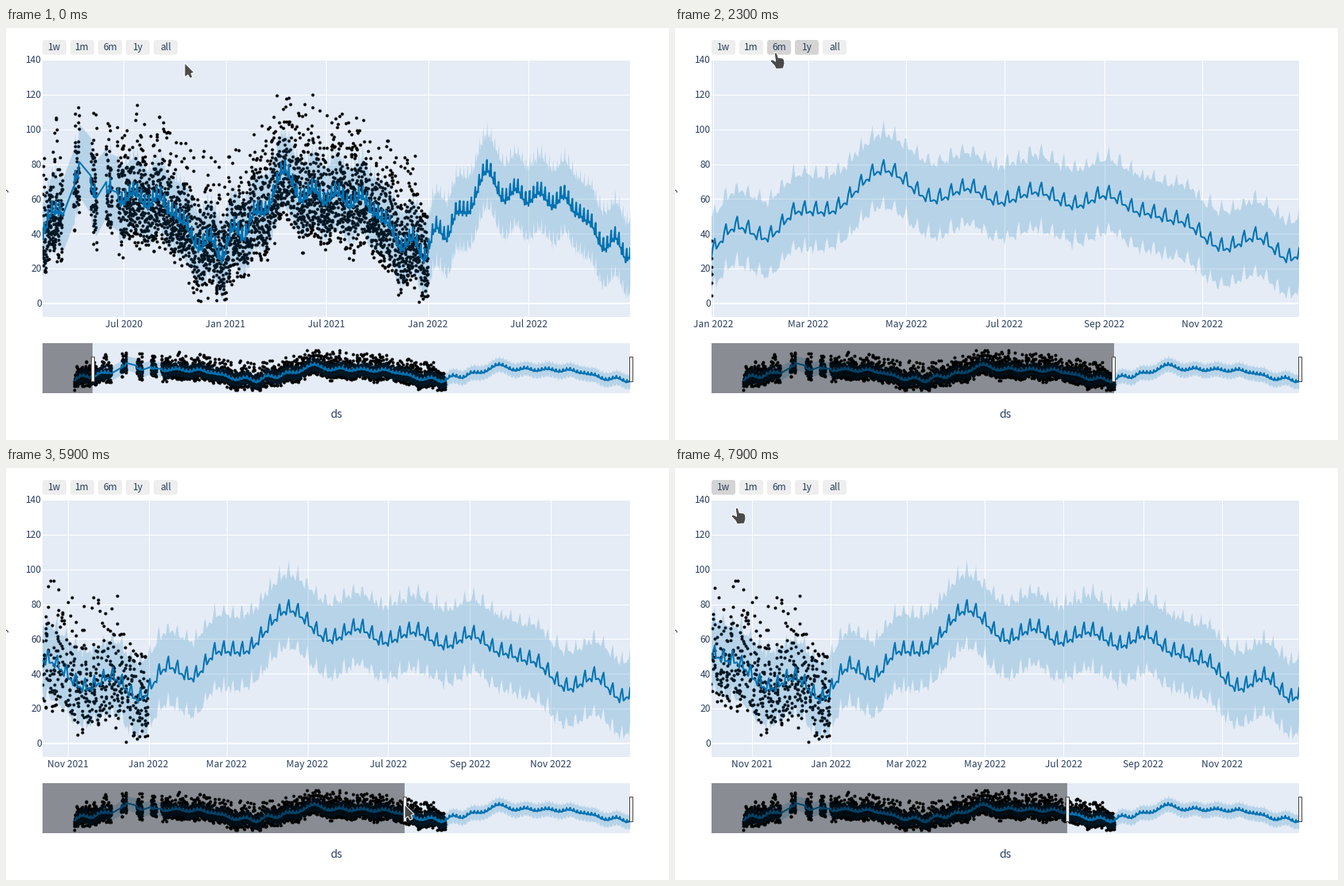
Animation, 835 px wide and 519 px high, one loop 8000 ms. Source, as a matplotlib script:

```python
import matplotlib.pyplot as plt
import numpy as np
from matplotlib.animation import FuncAnimation
from matplotlib.patches import FancyBboxPatch, Polygon, Rectangle

W, H, DPI = 835, 519, 64
PT = 72 / DPI                       # points per pixel
LEFT, RIGHT, TOP, BOTTOM = 46, 786, 40, 364
S_TOP, S_BOTTOM = 397, 460
Y_RANGE = (-7.75, 140)
END, FULL = 1095, 1158              # days since 2020-01-01; slider span in days
BLUE, PAPER, INK = "#0072B2", "#E5ECF6", "#2a3f5f"
IDLE, DARK = "#eeeeee", "#d4d4d4"

plt.rcParams["font.family"] = "Noto Sans CJK JP"


def ease(u):
    return u * u * (3 - 2 * u)


def eased(x, xs, ys):
    """Value at x on a curve that rests at every key point."""
    i = np.clip(np.searchsorted(xs, x, side="right") - 1, 0, len(xs) - 2)
    u = np.clip((x - xs[i]) / (xs[i + 1] - xs[i]), 0, 1)
    return ys[i] + (ys[i + 1] - ys[i]) * ease(u)


# ---------------------------------------------------------------- data
# turning points of the year (week, level), then offsets Monday to Sunday
TURNS = np.array([(2, 43), (4.5, 36.5), (7.5, 52), (10, 51.5), (15, 75.5),
                  (19.5, 58.5), (22.5, 65), (25.3, 57), (28.5, 63), (32, 55),
                  (34.7, 61), (38, 51), (41, 46.5), (45.3, 30.5), (48, 37),
                  (51, 24.5)])
TURNS = np.vstack([TURNS, TURNS[0] + (365.25 / 7, 0)])
WEEK = np.array([0, 0.3, 1, 0.5, -1.3, 4, 7])


def forecast(day):
    week = ((day - 732) / 7 - 2) % (365.25 / 7) + 2
    return eased(week, *TURNS.T) + WEEK[(day + 2) % 7]


rng = np.random.default_rng(12)
spans = [(0, 73), (92, 103), (123, 134), (151, 161), (171, 731)]
past = np.concatenate([np.arange(a, b) for a, b in spans])
days = np.concatenate([past, np.arange(731, END + 1)])
yhat = forecast(days)
upper = yhat + 21 + rng.normal(0, 1, len(days))
lower = yhat - 21 + rng.normal(0, 1, len(days))

# skewed scatter: dense below the line, long tail above it
obs_x = np.repeat(past, rng.integers(4, 8, len(past)))
noise = np.clip(rng.gamma(6, 6.5, len(obs_x)) - 39, -33, 48)
obs_y = np.abs(forecast(obs_x) + noise - 1) + 1

months = np.arange("2020-01", "2023-01", dtype="datetime64[M]")
month_day = (months.astype("datetime64[D]")
             - np.datetime64("2020-01-01")).astype(int)
NAMES = "Jan Feb Mar Apr May Jun Jul Aug Sep Oct Nov Dec".split()
month_name = [f"{NAMES[i % 12]} {2020 + i // 12}" for i in range(36)]

# ---------------------------------------------------------------- stage
fig = plt.figure(figsize=(W / DPI, H / DPI), dpi=DPI, facecolor="white")


def panel(top, bottom):
    ax = fig.add_axes([LEFT / W, 1 - bottom / H,
                       (RIGHT - LEFT) / W, (bottom - top) / H])
    ax.set(facecolor=PAPER, ylim=Y_RANGE)
    ax.spines[:].set_visible(False)
    ax.tick_params(length=0, labelbottom=False, labelleft=False)
    ax.plot(obs_x, obs_y, "o", color="black", ms=4 * PT, mew=0, zorder=2)
    ax.fill_between(days, lower, upper, color=BLUE, alpha=0.2, lw=0, zorder=3)
    ax.plot(days, yhat, color=BLUE, lw=2 * PT, zorder=4,
            solid_joinstyle="round")
    return ax


chart = panel(TOP, BOTTOM)
chart.set_axisbelow(True)
chart.set_yticks(range(0, 141, 20))
chart.grid(color="white", lw=PT)
chart.axhline(0, color="white", lw=2 * PT, zorder=0.8)

slider = panel(S_TOP, S_BOTTOM)
slider.set(xlim=(END - FULL, END), xticks=[], yticks=[])

ui = fig.add_axes([0, 0, 1, 1], zorder=5)
ui.set(xlim=(0, W), ylim=(H, 0))
ui.axis("off")


def label(x, y, s, size=12, ha="center", **kw):
    return ui.text(x, y, s, size=size * PT, color=INK, ha=ha,
                   **{"va": "baseline", **kw})


for v in range(0, 141, 20):
    y = TOP + (140 - v) * (BOTTOM - TOP) / (140 - Y_RANGE[0])
    label(45, y + 4.3, str(v), ha="right")
label(416, 491, "ds", 14)
label(3.5, 203, "y", 14, ha="right", va="center", rotation=90)
x_labels = [label(0, 377, "") for _ in range(8)]

BUTTONS = ["1w", "1m", "6m", "1y", "all"]
boxes = []
for i, name in enumerate(BUTTONS):
    box = FancyBboxPatch((46 + 35 * i, 15), 30, 18.7, fc=IDLE, ec="none",
                         boxstyle="round,pad=0,rounding_size=3.5")
    boxes.append(ui.add_patch(box))
    label(61 + 35 * i, 28, name)

mask = ui.add_patch(Rectangle((LEFT, S_TOP), 0, S_BOTTOM - S_TOP,
                              fc="black", alpha=0.4, lw=0))


def handle(x):
    return ui.add_patch(Rectangle((x, 413.5), 4, 31.5, fc="white",
                                  ec="#444444", lw=PT))


grip = handle(0)
handle(784.5)

ARROW = np.array([(0, 0), (0, 18), (4.2, 15), (6.8, 19.5), (10, 18),
                  (8.2, 13.4), (12, 12)])
HAND = np.array([(-1.8, 0.8), (-0.4, 0), (1.4, 0.8), (3, 6.2), (8.5, 7),
                 (10.5, 9), (11, 14), (9.3, 20), (0.3, 20.6), (-1.8, 16.5),
                 (-6.8, 11.2), (-6.4, 9.2), (-4, 9), (-0.4, 11)])
cursor = ui.add_patch(Polygon(ARROW, fc="#4a4a4a", ec="white", lw=PT,
                              joinstyle="round", zorder=9))

# ---------------------------------------------------------------- motion
# time, x, y of the pointer
PATH = np.array([(200, 225, 44), (900, 167, 24.5), (1800, 167, 24.5),
                 (2300, 127, 31), (3500, 127, 31), (4100, 575, 471),
                 (4300, 634, 433), (4700, 669.5, 424), (5000, 669.5, 424),
                 (5800, 502, 424), (6200, 502, 424), (6400, 423, 425),
                 (6700, 60, 24), (7500, 64, 22), (7800, 64, 22),
                 (7900, 78, 50)])
# start time, days shown, active button
VIEWS = [(0, 1059, None), (1600, 365, "1y"), (3500, 183, "6m"),
         (5900, 444.2, None), (6500, 450, None), (6900, 456.5, None)]


def hovered(ms, x, y):
    if ms >= 7900:                  # the button reacts late as the hand leaves
        return "1w"
    for i, name in enumerate(BUTTONS):
        if 0 <= x - 46 - 35 * i <= 30 and 15 <= y <= 34:
            return name
    return None


def show_range(span):
    chart.set_xlim(END - span, END)
    step = 6 if span > 600 else 2 if span > 200 else 1
    ticks = [i for i in range(0, 36, step) if month_day[i] >= END - span]
    chart.set_xticks(month_day[ticks])
    for text in x_labels:
        text.set_text("")
    for text, i in zip(x_labels, ticks):
        text.set_x(RIGHT - (END - month_day[i]) * (RIGHT - LEFT) / span)
        text.set_text(month_name[i])


def update(frame):
    ms = frame * 100
    _, span, active = [v for v in VIEWS if v[0] <= ms][-1]
    show_range(span)

    if 5000 <= ms < 5900:           # the grip moves before the chart follows
        span += (444.2 - span) * ease((ms - 5000) / 800)
    edge = RIGHT - span * (RIGHT - LEFT) / FULL
    mask.set_width(edge - LEFT)
    grip.set_x(edge - 2.5)

    x, y = (eased(ms, PATH[:, 0], PATH[:, k]) for k in (1, 2))
    over = hovered(ms, x, y)
    for name, box in zip(BUTTONS, boxes):
        box.set_facecolor(DARK if name in (over, active) else IDLE)
    cursor.set_xy((HAND if over else ARROW) + (x, y))
    return []


anim = FuncAnimation(fig, update, frames=80, interval=100, repeat=True,
                     repeat_delay=0, init_func=lambda: update(0), blit=False)
plt.show()
```
